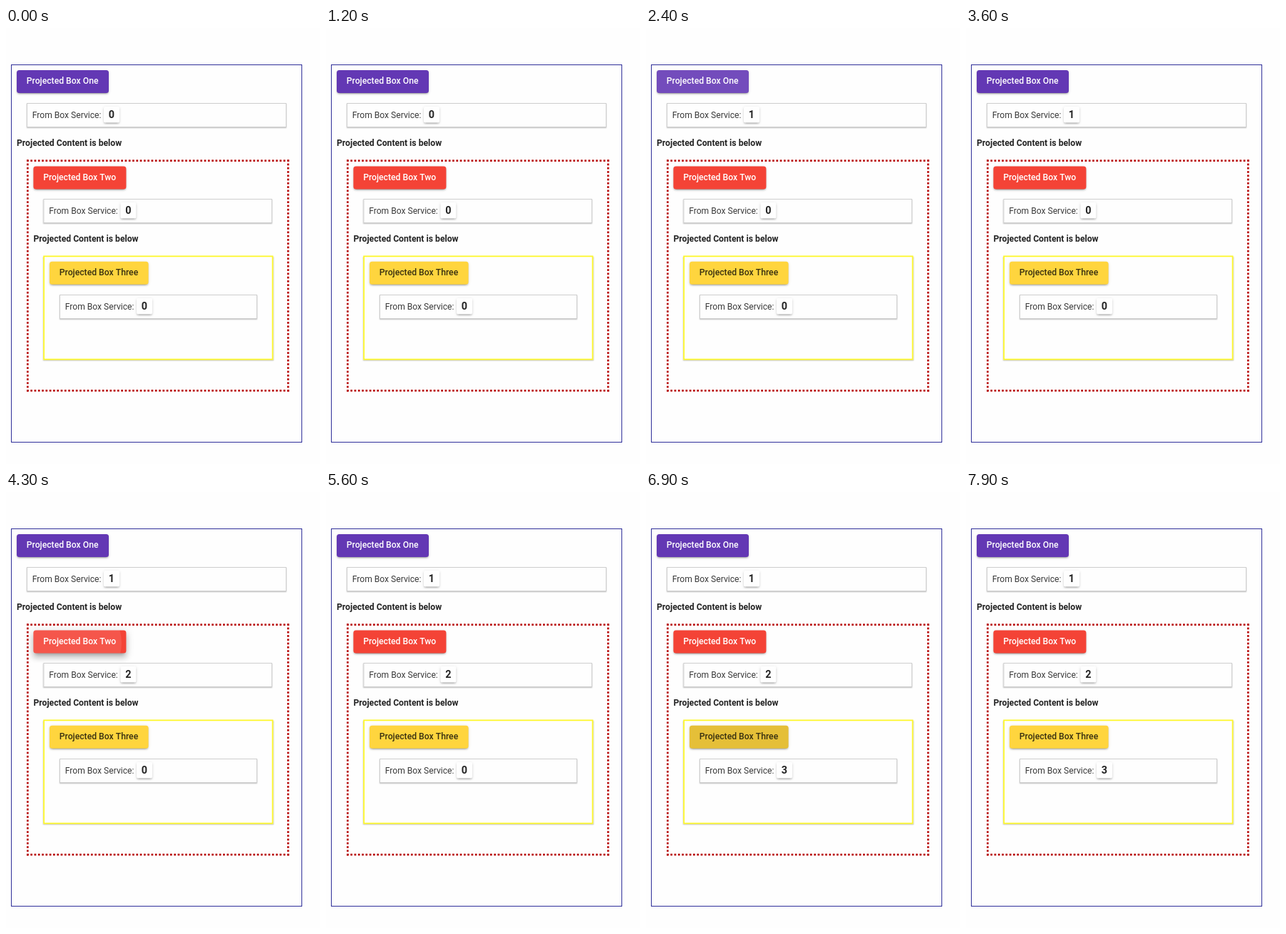
An HTML page with a canvas for the animation above (8000 ms loop, 440 by 610 pixels).

```html
<!DOCTYPE html>
<html lang="en">
<head>
<meta charset="utf-8">
<title>Projected boxes</title>
<style>
  html, body { margin: 0; width: 100%; height: 100%; overflow: hidden; background: #fefefe; }
  canvas { display: block; width: 440px; height: 610px; }
</style>
</head>
<body>
<canvas id="stage" width="440" height="610"></canvas>
<script>
const ctx = document.getElementById('stage').getContext('2d');
const LOOP = 8000;
const FONT = 'Roboto, Arial, sans-serif';
const INK = '#242424';

// Shadow layers as [offset y, blur, spread, alpha]
const REST = [[2.6, 1, -1.8, .2], [1.8, 1.8, 0, .14], [.9, 4.4, 0, .12]];
const RAISED = [[4.4, 4.4, -2.6, .2], [7, 8.8, .9, .14], [2.6, 12.3, 1.8, .12]];

// Button rectangle, colours, press centre, and times in ms
const buttons = [
  { x: 15, y: 59, w: 129, h: 32, fill: '#6338b4', ink: '#fff', label: 'Projected Box One',
    tint: '255,255,255', cx: 75, cy: 75, press: 1895, release: 2100, fade: 2600, count: 1 },
  { x: 38.4, y: 193.5, w: 130, h: 32, fill: '#f44336', ink: '#fff', label: 'Projected Box Two',
    tint: '255,255,255', cx: 96, cy: 211, press: 4070, release: 4250, fade: 4520, count: 2 },
  { x: 61, y: 326.7, w: 138.6, h: 32, fill: '#ffd53e', ink: '#383010', label: 'Projected Box Three',
    tint: '0,0,0', cx: 128, cy: 345, press: 6400, release: 6650, fade: 7200, count: 3 }
];

// Service panels, in the same order as the buttons
const panels = [
  { x: 29, y: 105, w: 364, h: 34 },
  { x: 52.4, y: 239, w: 320.6, h: 34 },
  { x: 75, y: 373, w: 277, h: 34 }
];

const clamp = v => Math.max(0, Math.min(1, v));
const mix = (a, b, k) => a + (b - a) * k;
const easeOut = v => 1 - (1 - v) ** 3;
const smooth = v => v * v * (3 - 2 * v);

function roundRect(x, y, w, h, r) {
  ctx.beginPath();
  ctx.roundRect(x, y, w, h, r);
}

function text(str, x, y, weight, size = 12.2, color = INK, align = 'left') {
  ctx.font = `${weight} ${size}px ${FONT}`;
  ctx.fillStyle = color;
  ctx.textAlign = align;
  ctx.fillText(str, x, y);
}

// Casts shadows only, by drawing the caster off stage
function shadow(x, y, w, h, r, layers) {
  const far = 2000;
  ctx.save();
  ctx.fillStyle = '#000';
  for (const [dy, blur, spread, alpha] of layers) {
    ctx.shadowColor = `rgba(0,0,0,${alpha})`;
    ctx.shadowBlur = blur;
    ctx.shadowOffsetX = far;
    ctx.shadowOffsetY = dy;
    roundRect(x - spread - far, y - spread, w + 2 * spread, h + 2 * spread, r);
    ctx.fill();
  }
  ctx.restore();
}

function frame(x, y, w, h, line, color) {
  ctx.strokeStyle = color;
  ctx.lineWidth = line;
  ctx.strokeRect(x + line / 2, y + line / 2, w - line, h - line);
}

function dottedSide(x1, y1, x2, y2) {
  const length = Math.hypot(x2 - x1, y2 - y1);
  const n = Math.round(length / 5.3);
  for (let i = 0; i <= n; i++) {
    ctx.fillRect(mix(x1, x2, i / n) - 1.35, mix(y1, y2, i / n) - 1.35, 2.7, 2.7);
  }
}

function dottedFrame(x, y, w, h, color) {
  const l = x + 1.35, t = y + 1.35, r = x + w - 1.35, b = y + h - 1.35;
  ctx.fillStyle = color;
  dottedSide(l, t, r, t);
  dottedSide(l, b, r, b);
  dottedSide(l, t, l, b);
  dottedSide(r, t, r, b);
}

function drawPanel({ x, y, w, h }, count) {
  shadow(x, y, w, h, 0, [[1, 1.5, 0, .25]]);
  ctx.fillStyle = '#fefefe';
  ctx.fillRect(x, y, w, h);
  frame(x, y, w, h, 1, '#cecece');
  text('From Box Service:', x + 7.8, y + 20.8, 400, 12.1, '#3a3a3a');

  shadow(x + 108, y + 5, 22, 22.5, 2, REST);
  ctx.fillStyle = '#fefefe';
  roundRect(x + 108, y + 5, 22, 22.5, 2);
  ctx.fill();
  text(count, x + 119, y + 21.3, 700, 14.4, INK, 'center');
}

function drawButton(b, t) {
  const { x, y, w, h } = b;
  const up = smooth(clamp((t - b.press) / 250));
  const down = smooth(clamp((t - b.release) / 250));
  const lift = up * (1 - down);
  shadow(x, y, w, h, 3.5, REST.map((layer, i) => layer.map((v, j) => mix(v, RAISED[i][j], lift))));

  ctx.save();
  roundRect(x, y, w, h, 3.5);
  ctx.fillStyle = b.fill;
  ctx.fill();
  ctx.clip();
  const grow = easeOut(clamp((t - b.press) / 450));
  const alpha = .1 * clamp((t - b.press) / 150) * (1 - clamp((t - b.fade) / 400));
  if (alpha > 0) {
    const reach = Math.hypot(Math.max(b.cx - x, x + w - b.cx), Math.max(b.cy - y, y + h - b.cy));
    ctx.fillStyle = `rgba(${b.tint},${alpha})`;
    ctx.beginPath();
    ctx.arc(b.cx, b.cy, reach * grow, 0, 7);
    ctx.fill();
  }
  ctx.restore();
  text(b.label, x + 13.8, y + 19.4, 500, 12.2, b.ink);
}

function draw(t) {
  ctx.fillStyle = '#fefefe';
  ctx.fillRect(0, 0, 440, 610);

  frame(7, 51, 408, 529, 1, '#30309a');
  dottedFrame(29, 184.3, 367.7, 324.4, '#b90d0d');
  shadow(52.2, 318.5, 322.3, 146, 0, [[1, 1.5, 0, .35]]);
  ctx.fillStyle = '#fefefe';
  ctx.fillRect(52.2, 318.5, 322.3, 146);
  frame(52.2, 318.5, 322.3, 146, 1.8, '#fdf72a');

  text('Projected Content is below', 15, 165, 700);
  text('Projected Content is below', 38.4, 299.3, 700);

  buttons.forEach((b, i) => {
    drawPanel(panels[i], t >= b.release ? b.count : 0);
    drawButton(b, t);
  });
}

const start = performance.now();
function tick() {
  draw((performance.now() - start) % LOOP);
  requestAnimationFrame(tick);
}
tick();
</script>
</body>
</html>
```
